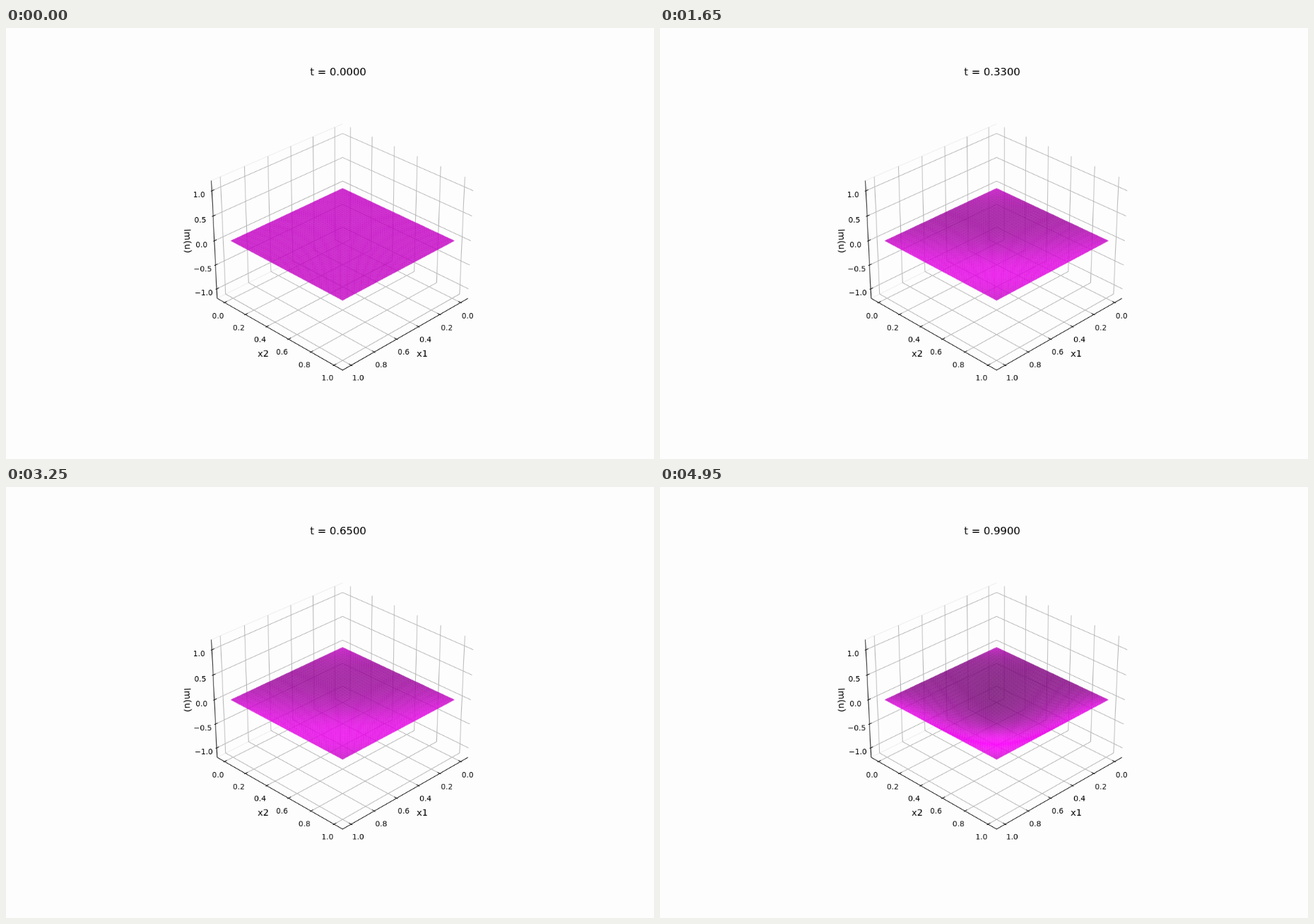
Write an HTML page with a canvas that moves like this. It is 917 px wide and 611 px high and loops after 5 s.

```html
<!DOCTYPE html>
<html lang="en">
<head>
<meta charset="utf-8">
<title>Im(u) surface</title>
<style>
  html, body { margin: 0; width: 100%; height: 100%; overflow: hidden; background: #fdfdfd; }
  canvas { display: block; width: 917px; height: 611px; }
</style>
</head>
<body>
<canvas id="plot" width="1200" height="800"></canvas>
<script>
const canvas = document.getElementById('plot');
const ctx = canvas.getContext('2d', { willReadFrequently: true });
ctx.scale(1200 / 917, 800 / 611);

const N = 50;                        // mesh cells per side
const LO = -0.073, HI = 1.073;       // padded x1 / x2 limits
const ZMAX = 1.198;
const TICK_OUT = 0.0095, TICK_IN = 0.019;
const PT = 1.0613;                   // one point in stage pixels
const OMEGA = 2 * Math.PI ** 2;
const COS30 = Math.sqrt(3) / 2;
const unitTicks = [0, 0.2, 0.4, 0.6, 0.8, 1];
const zTicks = [-1, -0.5, 0, 0.5, 1];

// Perspective view from azimuth 45°, elevation 30°
function project(x1, x2, z) {
  const near = (x1 + x2 - 1) * 0.73465;
  const side = (x2 - x1) * 0.73465;
  const up = z * 0.37267;
  const scale = 2156 / (10 - near * COS30 - up / 2);
  return [476.3 + side * scale, 301.6 + (near / 2 - up * COS30) * scale];
}

function trace(points) {
  ctx.beginPath();
  for (const p of points) ctx.lineTo(p[0], p[1]);
}

function line(color, ...points) {
  trace(points.map(p => project(...p)));
  ctx.strokeStyle = color;
  ctx.lineWidth = 0.8 * PT;
  ctx.stroke();
}

// Text centred on (x, y) by its digit height
function label(text, x, y, points, angle = 0) {
  const size = points * PT;
  ctx.save();
  ctx.translate(x, y);
  ctx.rotate(angle);
  ctx.font = `${size}px "DejaVu Sans", sans-serif`;
  ctx.textAlign = 'center';
  ctx.fillStyle = '#000';
  ctx.fillText(text, 0, size * 0.365);
  ctx.restore();
}

const format = v => v.toFixed(1).replace('-', '−');

function drawAxes() {
  const grid = '#b0b0b0', faint = '#ececec', black = '#000';
  for (const z of [-ZMAX, ZMAX]) line(faint, [HI, LO, z], [LO, LO, z]);

  for (const v of unitTicks) {
    line(grid, [v, HI, -ZMAX], [v, LO, -ZMAX], [v, LO, ZMAX]);
    line(grid, [HI, v, -ZMAX], [LO, v, -ZMAX], [LO, v, ZMAX]);
  }
  for (const z of zTicks) line(grid, [HI, LO, z], [LO, LO, z], [LO, HI, z]);

  line(black, [LO, HI, -ZMAX], [HI, HI, -ZMAX], [HI, LO, -ZMAX], [HI, LO, ZMAX]);

  for (const v of unitTicks) {
    line(black, [v, HI + TICK_OUT, -ZMAX], [v, HI - TICK_IN, -ZMAX]);
    line(black, [HI + TICK_OUT, v, -ZMAX], [HI - TICK_IN, v, -ZMAX]);
    const [rx, ry] = project(v, HI, -ZMAX);
    const [lx, ly] = project(HI, v, -ZMAX);
    const drop = 18.7 - 0.8 * v;
    label(format(v), rx + 9.9, ry + drop, 10);
    label(format(v), lx - 9.3, ly + drop, 10);
  }
  for (const z of zTicks) {
    line(black, [HI + TICK_OUT, LO, z], [HI - TICK_IN, LO, z]);
    const [x, y] = project(HI, LO, z);
    label(format(z), x - 18.2, y + 5.2, 10);
  }

  label('x1', 589, 461, 12);
  label('x2', 364, 461, 12);
  label('Im(u)', 257.5, 302, 12, 87.7 * Math.PI / 180);
}

function triangle(points, slope1, slope2) {
  const light = (2 * slope1 + 2 * slope2 + 1) / 3 / Math.hypot(slope1, slope2, 1);
  const level = Math.round(255 * (0.3 + 0.35 * (light + 1)));
  ctx.fillStyle = ctx.strokeStyle = `rgba(${level},0,${level},0.8)`;
  trace(points);
  ctx.closePath();
  ctx.fill();
  ctx.stroke();
}

function drawSurface(t) {
  const amplitude = -Math.sin(OMEGA * t);
  const wave = i => Math.sin(Math.PI * i / N);
  const height = (i, j) => amplitude * wave(i) * wave(j);
  const node = (i, j) => project(i / N, j / N, height(i, j));

  ctx.lineWidth = 0.2 * PT;
  ctx.lineJoin = 'round';
  // Diagonal rows of cells, back to front
  for (let row = 0; row <= 2 * N - 2; row++) {
    for (let i = Math.max(0, row - N + 1); i <= Math.min(row, N - 1); i++) {
      const j = row - i;
      const z00 = height(i, j), z10 = height(i + 1, j);
      const z01 = height(i, j + 1), z11 = height(i + 1, j + 1);
      const back = node(i, j), front = node(i + 1, j + 1);
      triangle([back, node(i + 1, j), front], (z10 - z00) * N, (z11 - z10) * N);
      triangle([back, front, node(i, j + 1)], (z11 - z01) * N, (z01 - z00) * N);
    }
  }
}

let shown = -1;
function render() {
  const step = Math.floor(performance.now() / 50) % 100;
  if (step !== shown) {
    shown = step;
    const t = step / 100;
    ctx.fillStyle = '#fdfdfd';
    ctx.fillRect(0, 0, 917, 611);
    drawAxes();
    drawSurface(t);
    label(`t = ${t.toFixed(4)}`, 470, 62, 14);
  }
  requestAnimationFrame(render);
}
render();
</script>
</body>
</html>
```
